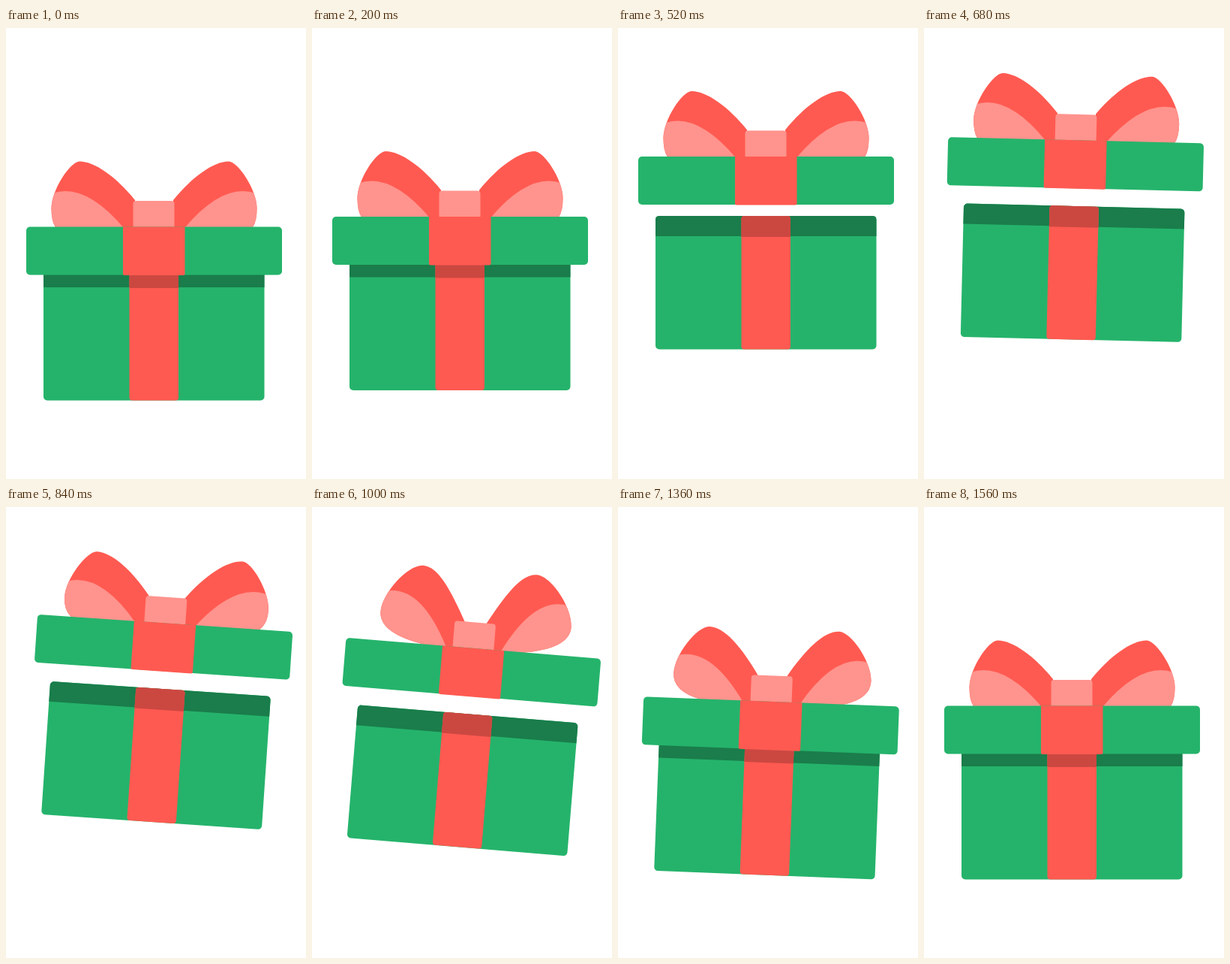
These frames come from a looping animation (400x600 px, 1600 ms). An HTML page with a canvas:

```html
<!DOCTYPE html>
<html lang="en">
<head>
<meta charset="utf-8">
<title>Gift box</title>
<style>
  html, body { margin: 0; width: 100%; height: 100%; overflow: hidden; background: #fff; }
  canvas { display: block; width: 400px; height: 600px; }
</style>
</head>
<body>
<canvas id="stage" width="400" height="600"></canvas>
<script>
const ctx = document.getElementById('stage').getContext('2d');
const LOOP = 1600, STEP = 40, CENTER = 197.5, LID_TOP = 265;
const PIVOT_X = 344.5, PIVOT_Y = 442;
const GREEN = '#25b36b', DARK_GREEN = '#1a7d4b';
const RED = '#ff5a51', PINK = '#ff938d', DARK_RED = '#cb4841';

const ease = (t, from, to) => {
  const p = Math.min(1, Math.max(0, (t - from) / (to - from)));
  return (1 - Math.cos(Math.PI * p)) / 2;
};
// Eases from 0 to 1, holds, then eases back to 0.
const pulse = (t, a, b, c, d) => ease(t, a, b) - ease(t, c, d);

function box(x, y, right, bottom, radii, color) {
  ctx.fillStyle = color;
  ctx.beginPath();
  ctx.roundRect(x, y, right - x, bottom - y, radii);
  ctx.fill();
}

// The left loop; raise 0 is relaxed, raise 1 stands upright.
function bowLoop(raise) {
  const mix = (a, b) => a + (b - a) * raise;
  const corner = mix(66, 132);
  const side = { x: mix(60.5, 70), y: mix(240, 226) };
  const top = { x: mix(98, 121.5), y: mix(177.5, 160.3) };
  const end = { x: mix(172, 185), y: mix(229, 234) };
  const fold = mix(220, 198);

  ctx.save();
  ctx.beginPath();
  ctx.moveTo(corner, LID_TOP);
  ctx.quadraticCurveTo(side.x, mix(257, 255), side.x, side.y);
  ctx.bezierCurveTo(side.x, side.y - 25, top.x - mix(12, 20), top.y, top.x, top.y);
  ctx.bezierCurveTo(top.x + 20, top.y, end.x - 25, end.y - mix(31, 46), end.x, end.y);
  ctx.lineTo(end.x, LID_TOP + 1);
  ctx.closePath();
  ctx.fillStyle = RED;
  ctx.fill();
  ctx.clip();

  ctx.beginPath();
  ctx.moveTo(mix(62, 76), fold);
  ctx.quadraticCurveTo(mix(105, 121), mix(205, 187), mix(157, 161), LID_TOP + 1);
  ctx.lineTo(40, LID_TOP + 5);
  ctx.lineTo(40, fold);
  ctx.closePath();
  ctx.fillStyle = PINK;
  ctx.fill();
  ctx.restore();
}

function bow(raise) {
  bowLoop(raise);
  ctx.save();
  ctx.translate(2 * CENTER, 0);
  ctx.scale(-1, 1);
  bowLoop(raise);
  ctx.restore();
  box(169.5, 230, 224.5, LID_TOP + 1, [4, 4, 0, 0], PINK);
}

function body() {
  box(50, 318, 344.5, 495.5, 5, GREEN);
  box(50, 318, 344.5, 345, [5, 5, 0, 0], DARK_GREEN);
  box(164.5, 318, 230, 495.5, 4, RED);
  box(164.5, 318, 230, 346, [4, 4, 0, 0], DARK_RED);
}

function lid(raise) {
  bow(raise);
  box(27, 264.5, 368, 328.5, 5, GREEN);
  box(156, 264.5, 238.5, 329, [0, 0, 2, 2], RED);
}

function draw(t) {
  const lift = 77.5 * pulse(t, 25, 665, 715, 1220);
  const gap = 34.2 * pulse(t, 265, 650, 1000, 1280);
  const tilt = 4.72 * pulse(t, 520, 960, 1190, 1520);
  const raise = pulse(t, 800, 1000, 1220, 1520);

  ctx.fillStyle = '#fff';
  ctx.fillRect(0, 0, 400, 600);
  ctx.save();
  ctx.translate(PIVOT_X, PIVOT_Y - lift);
  ctx.rotate(tilt * Math.PI / 180);
  ctx.translate(-PIVOT_X, -PIVOT_Y);
  body();
  ctx.translate(0, -gap);
  lid(raise);
  ctx.restore();
}

const start = performance.now();
function tick() {
  const t = (performance.now() - start) % LOOP;
  draw(Math.floor(t / STEP) * STEP);
  requestAnimationFrame(tick);
}
tick();
</script>
</body>
</html>
```
